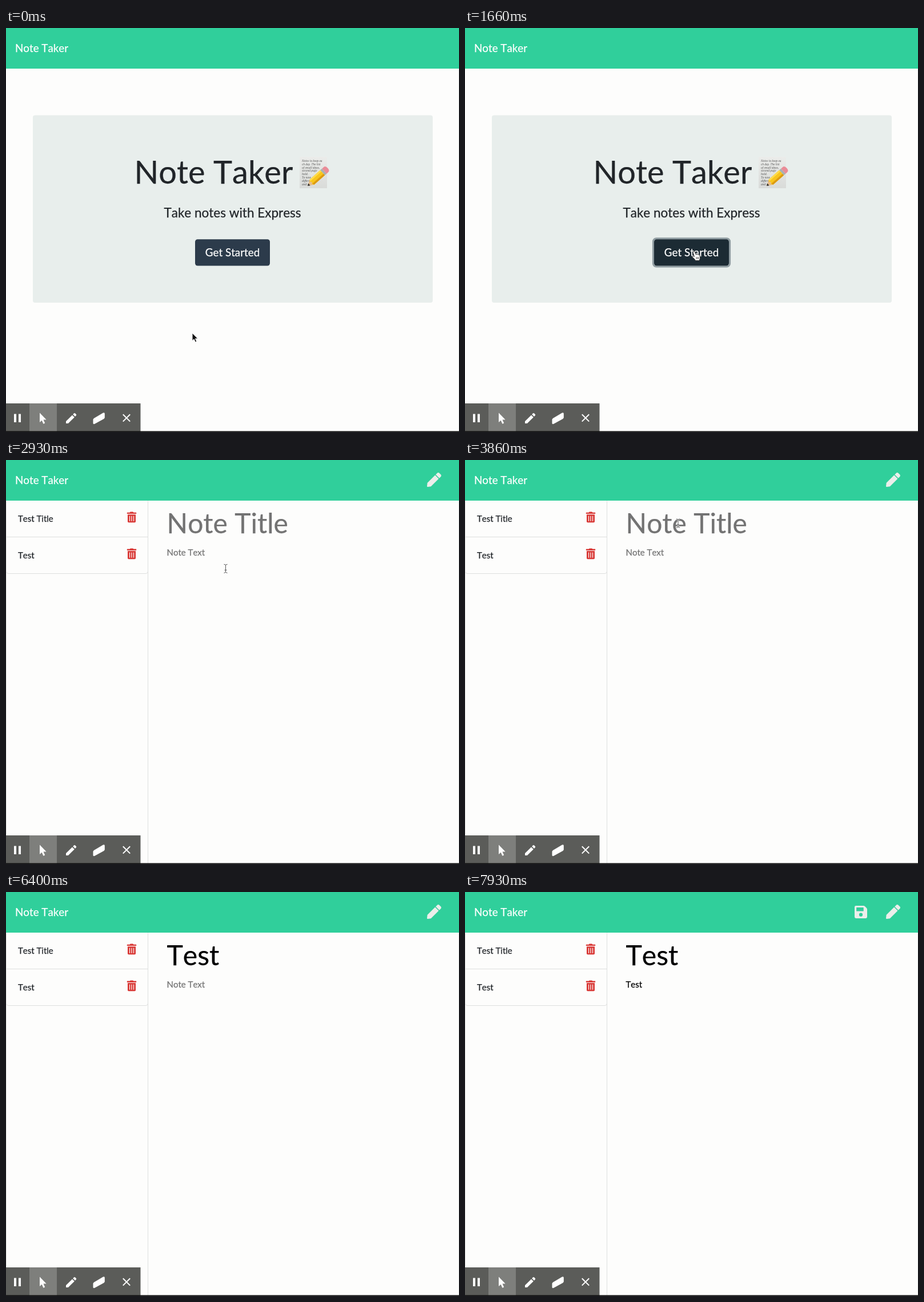
Animation, 793 px wide and 706 px high, one loop 8 s. Source, as an HTML page:

```html
<!DOCTYPE html>
<html lang="en">
<head>
<meta charset="utf-8">
<title>Note Taker</title>
<style>
  html, body { margin: 0; width: 100%; height: 100%; overflow: hidden; background: #fdfdfc; }
  svg { display: block; width: 793px; height: 706px; font-family: Lato, sans-serif; }
  text { white-space: pre; font-kerning: none; fill: currentColor; stroke: currentColor; stroke-width: .25px; }
  .script { font: italic 4.7px "Noto Serif", serif; color: #5a5a5a; }
  .script text { stroke: none; }
  .line { fill: none; stroke: #dedfde; }
</style>
</head>
<body>
<svg viewBox="0 0 793 706">
  <defs>
    <linearGradient id="paper" x2="0" y2="1">
      <stop stop-color="#ebecea"/><stop offset="1" stop-color="#d9dbd9"/>
    </linearGradient>
    <g id="pen">
      <path d="M291 93 419 221 141 499 27 512Q-2 514 0 485L13 371Z"/>
      <path d="M498 74 438 14Q404-14 370 14L313 71 441 199 498 142Q526 108 498 74Z"/>
    </g>
    <g id="trash" transform="scale(.0366)" fill="#d93a37">
      <path fill-rule="evenodd" d="M32 128H416V464a48 48 0 0 1-48 48H80a48 48 0 0 1-48-48ZM112 192V448H144V192ZM208 192V448H240V192ZM304 192V448H336V192Z"/>
      <path d="M432 32H312L303 13A24 24 0 0 0 281 0H167A24 24 0 0 0 145 13L136 32H16A16 16 0 0 0 0 48V80A16 16 0 0 0 16 96H432A16 16 0 0 0 448 80V48A16 16 0 0 0 432 32Z"/>
    </g>
  </defs>

  <rect width="793" height="706" fill="#fdfdfc"/>
  <rect width="793" height="71" fill="#30cf9b"/>
  <text x="16" y="42" font-size="18.75" color="#fff">Note Taker</text>
  <path class="line" d="M792.5 71V705" opacity=".6"/>

  <g id="home" color="#212529">
    <rect x="47" y="152.5" width="700" height="327.5" rx="4" fill="#e8eeec"/>
    <text x="224.5" y="272" font-size="56">Note Taker</text>
    <g id="memo">
      <rect x="514" y="225" width="48" height="55" fill="url(#paper)"/>
      <g id="scrawl" class="script"></g>
      <g transform="translate(528 276) rotate(-41.5)">
        <path d="M0 0 10-6V6Z" fill="#e6bd8b"/>
        <path d="M0 0 4-2.4V2.4Z" fill="#333"/>
        <path d="M10-6H35V6H10L8 3 10 0 8-3Z" fill="#f8c51c"/>
        <path d="M9 2.5H35V6H10Z" fill="#dc9a12"/>
        <path d="M10-6H35V-3H9Z" fill="#ffdc4c"/>
        <path d="M35-6H39V6H35Z" fill="#a9b0b2"/>
        <path d="M39-6H43Q47-6 47 0T43 6H39Z" fill="#ea8c98"/>
      </g>
    </g>
    <text x="396.5" y="331" font-size="22.5" text-anchor="middle">Take notes with Express</text>
    <rect id="ring" x="329.5" y="367.8" width="134" height="49.2" rx="5.5" fill="none" stroke="#8f9ca1" stroke-width="3.2"/>
    <rect id="button" x="331" y="369.3" width="131" height="46.2" rx="4.5"/>
    <text x="396.5" y="399" font-size="18.75" text-anchor="middle" color="#fff">Get Started</text>
  </g>

  <g id="notes">
    <path class="line" d="M.5 71V705M248.5 71V705"/>
    <use href="#pen" transform="translate(737 22) scale(.0488)" fill="#eceeeb"/>
    <path id="save" transform="translate(682 24)" fill="#eceeeb" fill-rule="evenodd" d="M2.4 0H15.5Q17 0 18 1L21 4Q22 5 22 6.5V19.6Q22 22 19.6 22H2.4Q0 22 0 19.6V2.4Q0 0 2.4 0ZM3.2 3.6V9Q3.2 9.5 3.7 9.5H15.2Q15.7 9.5 15.7 9V3.6Q15.7 3.1 15.2 3.1H3.7Q3.2 3.1 3.2 3.6ZM11 12.6A3.1 3.1 0 1 0 11 18.8 3.1 3.1 0 1 0 11 12.6Z"/>
    <g id="list" font-size="15" color="#212529">
      <path class="line" d="M1 134.5H248M.5 194Q.5 198.5 5 198.5H244Q248.5 198.5 248.5 194"/>
      <text x="21" y="108">Test Title</text>
      <text x="21" y="172">Test</text>
      <use href="#trash" transform="translate(211.8 90.6)"/>
      <use href="#trash" transform="translate(211.8 154.4)"/>
    </g>
    <text id="title" x="281.5" y="128" font-size="48"></text>
    <text id="body" x="281.5" y="167" font-size="15"></text>
    <rect id="titleCaret" y="83" width="1" height="53"/>
    <rect id="bodyCaret" y="151" width="1" height="20"/>
  </g>

  <g id="toolbar" fill="#fff">
    <rect y="656" width="235.5" height="49" fill="#5b5c59"/>
    <rect x="41" y="656" width="48" height="49" fill="#7e7f7c"/>
    <path d="M14 674.5H18V689H14ZM22 674.5H26V689H22Z"/>
    <path d="M59 672.6V689L62.7 685.7 65.4 691.8 68.2 690.6 65.5 684.6H70.6Z"/>
    <path d="M105 687.3 116 676.4 119.8 680.2 108.9 691.1H105ZM117.2 675.2 119.1 673.3Q120 672.6 120.9 673.3L122.9 675.3Q123.6 676.2 122.9 677.1L121 679Z"/>
    <path d="M154 682 170 672.6Q172.8 671.5 172.8 674V680.5Q172.8 682 171.4 682.9L155.4 691.8Q152.5 693 152.5 690.4V684.5Q152.5 683 154 682Z"/>
    <path d="M204.8 675.2 217.2 687.6M217.2 675.2 204.8 687.6" stroke="#fff" stroke-width="2"/>
  </g>
  <rect y="704.5" width="793" height="1.5" fill="#111"/>

  <g id="pointer">
    <path id="arrow" d="M0 0V13.6L3.1 10.8 5.4 16 7.8 15 5.5 9.9H9.8Z" fill="#111" stroke="#fff"/>
    <path id="hand" transform="translate(-3.5 -1)" d="M3 1Q4.6 0 5.4 2L6.8 6Q8 4.8 9 6 10.4 5 11.4 6.6 13.3 5.9 13.9 8L14.6 11.5Q14.8 13.6 13.2 16.8H6.4Q5.2 14.4 2.8 12.4 0 10.6 1 9.4 2 8.4 4.4 10L2.2 3Q2 1.6 3 1ZM8 11V14M10 11V14M12 11V14" fill="#fff" stroke="#333"/>
    <g id="beam" fill="none">
      <path d="M-3-7Q0-7 0-5 0-7 3-7M0-5V6M-3 8Q0 8 0 6 0 8 3 8M-2 3H2" stroke="#fff" stroke-width="2.4"/>
      <path d="M-3-7Q0-7 0-5 0-7 3-7M0-5V6M-3 8Q0 8 0 6 0 8 3 8M-2 3H2" stroke="#555"/>
    </g>
  </g>
</svg>

<script>
const LOOP = 8000, FPS = 15;
const $ = id => document.getElementById(id);
const show = (id, on) => $(id).style.display = on ? '' : 'none';
const clamp = v => Math.min(1, Math.max(0, v));
const ease = p => p * p * (3 - 2 * p);
const within = (t, spans) => spans.some(([a, b]) => t >= a && t < b);

// Pointer legs: start, end, from, to
const legs = [
  [0, 866, [326, 533], [400.5, 390.5]],
  [2266, 3133, [400.5, 390.5], [382, 158]],
  [3133, 3660, [382, 158], [373, 110]]
];
const fields = {
  title: { hint: 'Note Title', keys: [5060, 5200, 5330, 5400], caret: [[3330, 3860], [4400, 4860], [5060, 5860]] },
  body: { hint: 'Note Text', keys: [6860, 7060, 7200, 7460], caret: [[5860, 6400], [6860, 7930]] }
};

['Notes to keep ea', 'ch day. The list', 'of small ideas,', 'second page', 'hold.', 'To now, w', 'different', 'and so'].forEach((words, i) => {
  const line = document.createElementNS('http://www.w3.org/2000/svg', 'text');
  line.setAttribute('x', 518);
  line.setAttribute('y', 234 + i * 5.8);
  line.textContent = words;
  $('scrawl').append(line);
});

function pointerAt(t) {
  const [a, b, from, to] = legs.filter(leg => t >= leg[0]).pop();
  const p = ease(clamp((t - a) / (b - a)));
  return from.map((v, i) => v + (to[i] - v) * p);
}

function drawField(id, t) {
  const { hint, keys, caret } = fields[id];
  const typed = 'Test'.slice(0, keys.filter(k => t >= k).length);
  const text = $(id);
  text.textContent = typed || hint;
  text.setAttribute('color', typed ? '#000' : '#737373');
  const end = typed ? text.getComputedTextLength() : 0;
  $(id + 'Caret').setAttribute('x', Math.round(281.5 + end));
  show(id + 'Caret', within(t, caret));
}

function draw(t) {
  const home = t < 1930;
  show('home', home);
  show('notes', !home);
  show('list', t >= 2060);
  show('save', t >= 6930);

  const [x, y] = pointerAt(t);
  const over = y < 415;
  $('button').setAttribute('fill', over ? '#1c2b34' : '#2c3b4b');
  $('ring').setAttribute('opacity', clamp((t - 1270) / 200));

  $('pointer').setAttribute('transform', `translate(${x} ${y})`);
  const shape = t >= 2330 ? 'beam' : over ? 'hand' : 'arrow';
  for (const s of ['arrow', 'hand', 'beam']) show(s, s === shape);
  show('pointer', t < 5200);

  if (!home) for (const id in fields) drawField(id, t);
}

const start = performance.now();
function tick() {
  const t = (performance.now() - start) % LOOP;
  draw(Math.floor((t + 7) * FPS / 1000) * 1000 / FPS);
  requestAnimationFrame(tick);
}
draw(0);
requestAnimationFrame(tick);
</script>
</body>
</html>
```
